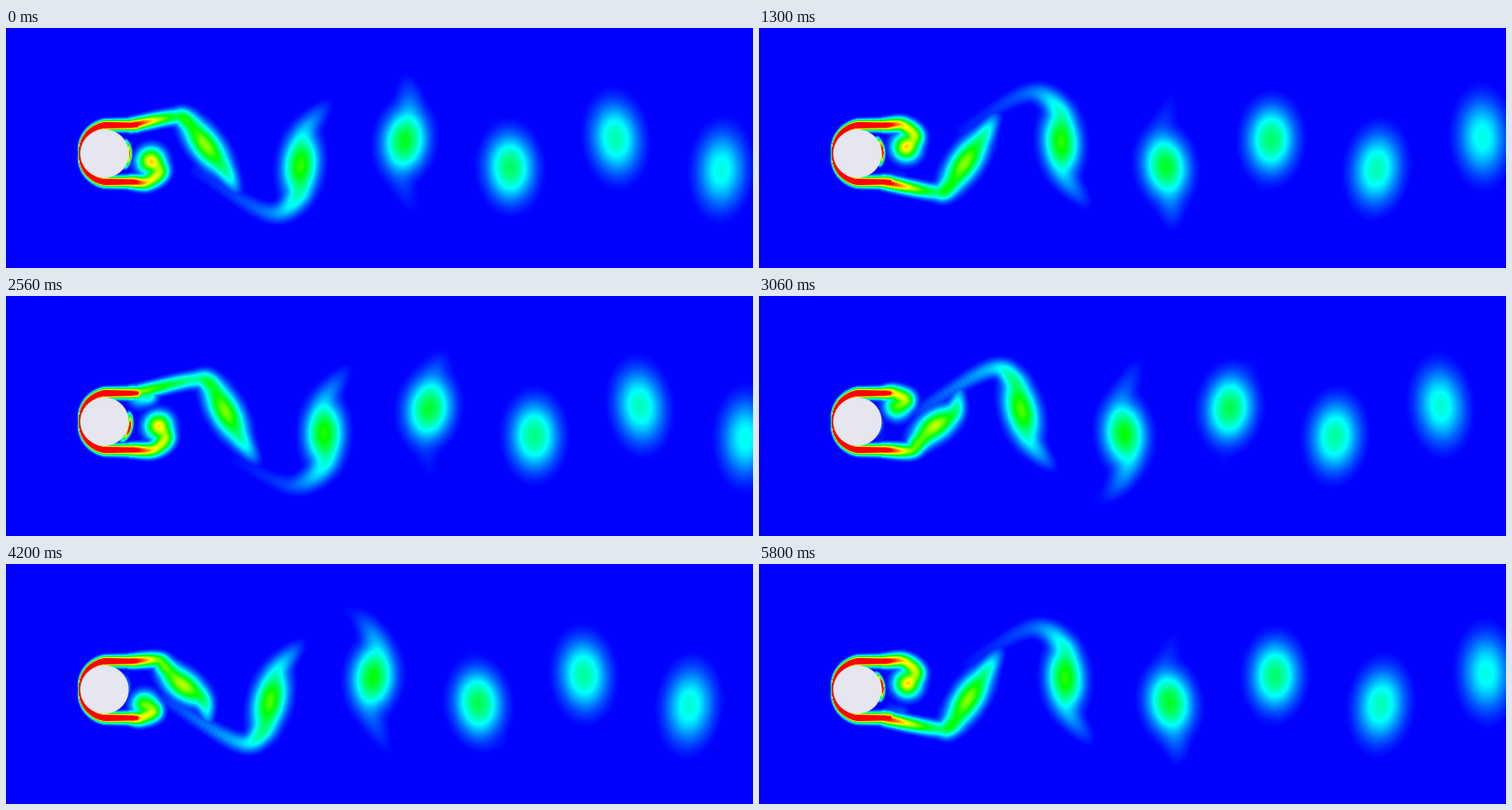
Recreate the animation shown at these times as a matplotlib script. Size 800 by 258 pixels, loop 5.9 s.

```python
import numpy as np
import matplotlib.pyplot as plt
from matplotlib.animation import FuncAnimation
from matplotlib.colors import LinearSegmentedColormap
from matplotlib.patches import Circle

W, H, DPI = 800, 258, 100
LOOP, TICK = 5900, 20      # ms
HOLD, STEP = 160, 100 / 3  # first pause and step length, ms
LAST = 170
CX, MID, R = 105.5, 135, 26
TOP = 104.5                # height of the upper shear layer
GAP = 113                  # distance between neighbouring vortices

px = np.arange(W, dtype=np.float32) + .5
py = np.arange(H, dtype=np.float32)[:, None] + .5


def ease(x, a, b):
    t = np.clip((x - a) / (b - a), 0, 1)
    return t * t * (3 - 2 * t)


def bump(x, mid, width):
    return np.exp(-.5 * ((x - mid) / width) ** 2)


def mix(a, b, t):
    return a + (b - a) * t


def spline_basis(n, m):
    """Catmull-Rom weights for m samples along n control points."""
    e = np.eye(n)
    e = np.vstack([2 * e[0] - e[1], e, 2 * e[-1] - e[-2]])
    t = np.linspace(0, n - 1, m)
    i = np.minimum(t.astype(int), n - 2)
    f = (t - i)[:, None]
    a, b, c, d = e[i], e[i + 1], e[i + 2], e[i + 3]
    return .5 * (2 * b + (c - a) * f + (2 * a - 5 * b + 4 * c - d) * f**2
                 + (3 * b - a - 3 * c + d) * f**3)


BASIS = spline_basis(6, 90)


def stamp(layer, x, y, amp, minor, major=None, tilt=0):
    """Lay a Gaussian spot over a layer, keeping the stronger value."""
    major = major or minor
    r = 3.4 * max(minor, major)
    x0, x1 = max(int(x - r), 0), min(int(x + r) + 1, W)
    y0, y1 = max(int(y - r), 0), min(int(y + r) + 1, H)
    if amp < .004 or x0 >= x1 or y0 >= y1:
        return
    dx, dy = px[x0:x1] - np.float32(x), py[y0:y1] - np.float32(y)
    if tilt:
        c, s = np.float32(np.cos(tilt)), np.float32(np.sin(tilt))
        dx, dy = dx * c - dy * s, dx * s + dy * c
    q = dx * dx * np.float32(-.5 / minor**2) + dy * dy * np.float32(-.5 / major**2)
    part = layer[y0:y1, x0:x1]
    np.maximum(part, np.float32(amp) * np.exp(q), out=part)


def flip(y, side):
    return MID + side * (y - MID)


# Everything below is described for vortices shed from the top (side = 1) and
# mirrored for the others. "age" is the x a vortex would have at steady drift.

def strength(age):
    return .82 * np.exp(-age / 766)


def center(age):
    x = 140 + 50 * np.log1p(np.exp((age - 140) / 50))
    y = (123 + 9 * bump(age, 140, 42) - .012 * max(age - 300, 0)
         - 14 * (1 - ease(age, 0, 90)))
    return np.array([x, y])


def lean(age):
    """Tilt of the long axis: a decaying swing, positive with the top left."""
    swing = min(7 + 21 * np.exp((231 - age) / 80), 55)
    return -np.radians(swing) * np.cos(np.pi * (max(age, 231) - 457) / 226)


def spine(age):
    """Control points (x, y, strength, width) from shear layer to tail tip."""
    x, y = core = center(age)
    a, tilt = strength(age), lean(age)
    grown = ease(age, 100, 200)
    freed = ease(age, 205, 250)

    # stretched pose: crest behind the core, tail ahead of it
    axis = 34 * np.array([-np.sin(tilt), -np.cos(tilt)])
    crest = np.array([x - 36 + .5 * max(age - 355, 0), 52 + .21 * abs(age - 410)])
    trail = bump(age, 295, 50)
    end = mix(np.array([134, TOP]), crest + [-20 - 60 * trail, -14 + 62 * trail], freed)
    tip = core + [36 - .2 * max(age - 290, 0), 80 - .13 * abs(age - 400)]
    drawn = np.array([end, crest, core + axis, core, core - axis, tip])

    # rolled pose: the layer folds over and ends inside the core
    rolled = np.array([end, [x - 4, TOP], [x + 9, (TOP + y) / 2], core, core, core])

    crest_amp = min(.5 * np.exp((201 - age) / 90), .6)
    arm = a * max(.85 - .0022 * max(age - 200, 0), 0)
    drawn_amp = np.array([0, crest_amp, arm, .5 * a, .7 * arm, .03])
    rolled_amp = np.array([0, .8, .7, .5, .5, .5]) * ease(age, -30, 30)
    amp = mix(rolled_amp, drawn_amp, grown)
    amp[0] = mix(1.15, .4 * crest_amp, freed)

    width = np.array([4.2, 5.4, 7, 8, 7, 5]) + .018 * max(age - 200, 0)
    return np.column_stack([mix(rolled, drawn, grown), amp, width])


def draw_spine(layer, age, side):
    for x, y, amp, w in BASIS @ spine(age):
        stamp(layer, x, flip(y, side), amp, max(w, 1))


def draw_core(layer, age, side):
    x, y = center(age)
    minor = 17.5 - 8 / (1 + np.exp((age - 340) / 60))
    major = 10 + 12.5 * ease(age, 110, 210) + .018 * max(age - 450, 0)
    stamp(layer, x, flip(y, side), strength(age) * ease(age, 20, 80),
          minor, major, side * lean(age))


def draw_rear(layer, age, side):
    """Thin strip that the rolling vortex pulls along the cylinder's back."""
    grow = ease(age, 100, 150)
    radius, amp = R + 1 + 4 * grow, 1.2 * bump(age, 105, 24)
    for off in np.linspace(-34, 34, 31):
        a = np.radians((age - 85) * .5 + off)
        stamp(layer, CX + radius * np.cos(a), flip(MID - radius * np.sin(a), side),
              amp * np.cos(np.radians(off * 2.3)), 1.5 + 1.5 * grow)


def draw_layer(layer, side):
    """Boundary layer: thickens over the front, then leaves the cylinder."""
    for u in np.linspace(0, 1, 60):
        a, r = np.radians(180 - 90 * u), R + .3 + 4.2 * u**1.5
        stamp(layer, CX + r * np.cos(a), flip(MID - r * np.sin(a), side),
              1.5, 1 + 2.3 * u)
        stamp(layer, mix(CX, 140, u), flip(TOP, side), mix(1.5, 1.05, u), mix(3.3, 4, u))


base = np.zeros((H, W), np.float32)
for side in (1, -1):
    draw_layer(base, side)


def field(n):
    shift = 3.491 * n - .00054 * n * n
    bands, cores = base.copy(), np.zeros_like(base)
    first = int(np.ceil((-25 - 427 - shift) / GAP))
    for k in range(first, first + 9):
        age, side = 427 + shift + GAP * k, 1 if k % 2 == 0 else -1
        if age < 560:
            draw_spine(bands, age, side)
        if 40 < age < 180:
            draw_rear(bands, age, side)
        draw_core(cores, age, side)
    return np.maximum(np.cbrt(bands**3 + cores**3) - .03, 0) * 1.03


fig = plt.figure(figsize=(W / DPI, H / DPI), dpi=DPI)
ax = fig.add_axes([0, 0, 1, 1])
ax.axis("off")
rainbow = LinearSegmentedColormap.from_list(
    "rainbow5", ["#0000ff", "#00ffff", "#00ff00", "#ffff00", "#ff0000"], N=1024)
image = ax.imshow(base, cmap=rainbow, vmin=0, vmax=1, interpolation="nearest",
                  extent=(0, W, H, 0), aspect="auto")
ax.add_patch(Circle((CX, MID), R, fc="#e6e6f0", ec="none"))
ax.set_xlim(0, W)
ax.set_ylim(H, 0)

cache = {}


def update(i):
    t = i * TICK
    n = 0 if t < HOLD else min(1 + int((t - HOLD) / STEP + 1e-6), LAST)
    if n not in cache:
        cache[n] = field(n)
    image.set_data(cache[n])
    return [image]


anim = FuncAnimation(fig, update, frames=LOOP // TICK, interval=TICK,
                     repeat=True, repeat_delay=0, blit=False)
plt.show()
```
